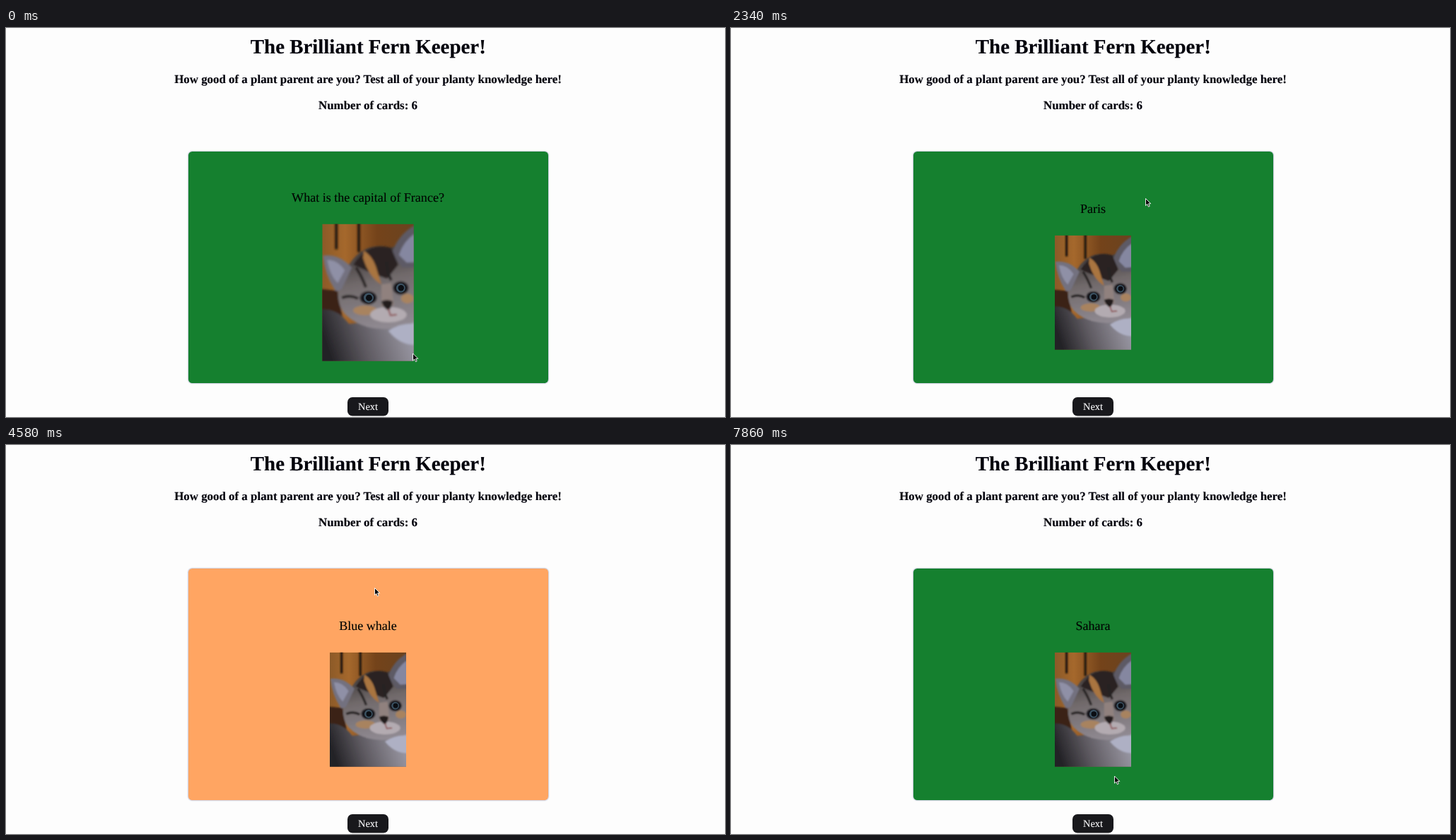
An HTML page for the animation above (8 s loop, 1017 by 551 pixels).

```html
<!DOCTYPE html>
<html lang="en">
<head>
<meta charset="utf-8">
<title>Flash cards</title>
<style>
  html, body { margin: 0; width: 100%; height: 100%; overflow: hidden; background: #fdfdfd; }
  svg { display: block; }
  #stage { width: 100%; height: 100%; }
  text {
    font: 18.05px "Liberation Serif", Times, serif;
    text-anchor: middle;
    text-rendering: geometricPrecision;
    color: #02020c;
    fill: currentColor;
    stroke: currentColor;
    stroke-width: .15px;
  }
  .bold { font-weight: bold; font-size: 16.9px; }
  .title { font-size: 28.9px; }
  .button { font-size: 14.45px; color: #f6f6f8; }
</style>
</head>
<body>
<svg id="stage" viewBox="0 0 1017 551">
  <defs>
    <linearGradient id="wood">
      <stop offset="0" stop-color="#8c5a28"/>
      <stop offset=".25" stop-color="#a5682c"/>
      <stop offset=".6" stop-color="#74431a"/>
      <stop offset="1" stop-color="#6a431f"/>
    </linearGradient>
    <linearGradient id="fur" x1=".3" y1="0" x2=".5" y2="1">
      <stop offset="0" stop-color="#35302f"/>
      <stop offset=".45" stop-color="#716a6b"/>
      <stop offset="1" stop-color="#908a92"/>
    </linearGradient>
    <linearGradient id="chest" x1="0" y1=".2" x2="1" y2="0">
      <stop offset="0" stop-color="#242327"/>
      <stop offset=".35" stop-color="#5e5a61"/>
      <stop offset=".7" stop-color="#8b8892"/>
      <stop offset="1" stop-color="#a9abbd"/>
    </linearGradient>
    <filter id="soft" x="-20%" y="-20%" width="140%" height="140%"><feGaussianBlur stdDeviation="1.6"/></filter>
    <symbol id="kitten" viewBox="0 0 130 195" preserveAspectRatio="none">
      <rect width="130" height="195" fill="url(#wood)"/>
      <g filter="url(#soft)">
        <path d="M52-5V40M20-5V36" stroke="#24150c" stroke-width="4"/>
        <path d="M-5 92L22 95 30 140-5 140Z" fill="#3a2412"/>
        <path d="M-5 122Q20 118 38 142L125 135 140 130V205H-5Z" fill="url(#chest)"/>
        <path d="M38 58Q60 24 96 34L118 28 140 50V134Q114 151 84 149 52 148 32 128 20 114 23 88Z" fill="url(#fur)"/>
        <path d="M1 45Q24 42 42 62L28 92Q20 99 17 92 4 72 1 45Z" fill="#73717f"/>
        <path d="M7 51Q22 51 32 66L22 84Q11 73 7 51Z" fill="#8f90a6"/>
        <path d="M131 2Q107 16 99 42L114 62 135 62Z" fill="#5d5a65"/>
        <path d="M131 14Q115 25 109 44L120 55 135 54Z" fill="#8587a0"/>
        <path d="M44 58Q66 24 98 34L108 58 92 78Q60 66 44 58Z" fill="#292424"/>
        <path d="M59 38Q71 45 76 60L84 86Q66 75 58 48Z" fill="#a9743f"/>
        <path d="M48 62Q56 74 62 90M92 54Q91 66 98 80M28 105Q40 100 51 106" fill="none" stroke="#282424" stroke-width="4"/>
        <ellipse cx="61" cy="123" rx="17" ry="7" fill="#a8835f"/>
        <ellipse cx="121" cy="106" rx="9" ry="7" fill="#a8835f"/>
        <path d="M84 86L98 84 102 116 84 118Z" fill="#90817e"/>
        <ellipse cx="94" cy="129" rx="26" ry="11" fill="#b3abb1"/>
        <path d="M94 152Q112 140 132 142V172Q110 172 94 152Z" fill="#aeb0c4"/>
        <ellipse cx="65.5" cy="105" rx="12" ry="9.5" fill="#17181c"/>
        <ellipse cx="111.5" cy="91" rx="11" ry="9.5" fill="#17181c"/>
        <path d="M84 110Q92 106 100 110 99 119 94 123 86 119 84 110Z" fill="#231d1d"/>
        <path d="M94 121L97 130 106 129" fill="none" stroke="#8a4a4c" stroke-width="2"/>
      </g>
      <g fill="#3b5262">
        <circle cx="66" cy="105" r="7"/>
        <circle cx="111.5" cy="91" r="6.5"/>
      </g>
      <g fill="#0b0e13">
        <circle cx="66.5" cy="105" r="4.5"/>
        <circle cx="112" cy="91" r="4.2"/>
      </g>
    </symbol>
  </defs>

  <rect width="1017" height="551" fill="#fdfdfd"/>
  <text class="bold title" x="512.3" y="35.5">The Brilliant Fern Keeper!</text>
  <text class="bold" x="512" y="78">How good of a plant parent are you? Test all of your planty knowledge here!</text>
  <text class="bold" x="512" y="115">Number of cards: 6</text>

  <rect x="256.2" y="173.4" width="512.6" height="331.4" rx="7" fill="#f0f1f5"/>
  <rect x="257" y="174" width="511" height="330" rx="6.5" fill="#d3d6e4"/>
  <rect id="card" x="258" y="175" width="509" height="328" rx="5.5"/>
  <text id="label" x="512" style="color:#010503"></text>
  <use id="photo" href="#kitten"/>

  <rect x="483" y="523" width="58" height="26.5" rx="7" fill="#18181c"/>
  <text class="button" x="512" y="541">Next</text>

  <path id="arrow" d="M.5.5V10.6L2.8 8.5 4.5 12.2 6.2 11.4 4.6 7.8H7.8Z" fill="#050505" stroke="#fff" stroke-width=".9" stroke-linejoin="round"/>
  <path id="hand" d="M3.2 7.6V1.7Q4.2.2 5.2 1.7V5Q6.4 4.2 7.2 5.2 8.4 4.6 9.2 5.7 10.8 5.2 11.1 6.8V9.2Q11 11 9.8 13H4.4Q3.6 11 1 8.4.4 6.9 1.8 6.9Z M5.6 8.5V11M7.3 8.5V11M9 8.5V11" fill="#fff" stroke="#111" stroke-width=".8" stroke-linejoin="round"/>
</svg>
<script>
const LOOP = 8000, STEP = 148, BUTTON_TOP = 515;
const CENTER = { x: 512, y: 374.7 };
const GREEN = '#15802f', ORANGE = '#ffa562';
const $ = id => document.getElementById(id);

const cards = [
  { start: 0, flip: 2200, color: GREEN, question: 'What is the capital of France?', answer: 'Paris' },
  { start: 3530, flip: 4580, color: ORANGE, question: 'What is the largest mammal in the world?', answer: 'Blue whale' },
  { start: 6810, flip: 7560, color: GREEN, question: 'What is the largest desert in the world?', answer: 'Sahara' }
];

// Each move runs in equal time steps; bend bows its path sideways.
const home = { x: 575, y: 460.5 };
const moves = [
  { start: 150, steps: 3, x: 535, y: 475 },
  { start: 600, steps: 5, x: 615, y: 384 },
  { start: 2340, steps: 1, x: 586, y: 241 },
  { start: 2940, steps: 4, x: 517, y: 542 },
  { start: 3530, steps: 3, x: 519, y: 253 },
  { start: 4130, steps: 2, x: 521, y: 202 },
  { start: 4870, steps: 6, x: 511, y: 525, bend: 18 },
  { start: 6810, steps: 4, x: 540, y: 200, bend: 28 },
  { start: 7860, steps: 1, x: 542, y: 468.5 }
];

const easeOut = p => 1 - (1 - p) ** 1.4;
const mix = (a, b, p) => a + (b - a) * p;

function pointerAt(t) {
  const i = moves.findLastIndex(m => m.start <= t);
  if (i < 0) return home;
  const from = moves[i - 1] || home, { start, steps, x, y, bend = 0 } = moves[i];
  const done = Math.min(steps, Math.floor((t - start) / STEP) + 1);
  const p = easeOut(done / steps);
  return { x: mix(from.x, x, p) + bend * Math.sin(Math.PI * p), y: mix(from.y, y, p) };
}

function set(id, attrs) {
  for (const name in attrs) $(id).setAttribute(name, attrs[name]);
}

function drawCard(t) {
  const card = cards.findLast(c => c.start <= t);
  const label = $('label');
  label.textContent = t < card.flip ? card.question : card.answer;
  // The photo scales with the text above it, down to a minimum.
  const width = .6 * Math.max(180, label.getComputedTextLength());
  const height = width * 1.5, top = CENTER.y - height / 2;
  set('card', { fill: card.color });
  set('label', { y: top - 31.3 });
  set('photo', { x: CENTER.x - width / 2, y: top, width, height });
}

function drawPointer(t) {
  const { x, y } = pointerAt(t);
  const shown = y > BUTTON_TOP ? 'hand' : 'arrow';
  for (const id of ['arrow', 'hand'])
    set(id, { transform: `translate(${x} ${y})`, visibility: id === shown ? 'visible' : 'hidden' });
}

const start = performance.now();
function tick() {
  const t = (performance.now() - start) % LOOP;
  drawCard(t);
  drawPointer(t);
  requestAnimationFrame(tick);
}
tick();
</script>
</body>
</html>
```
